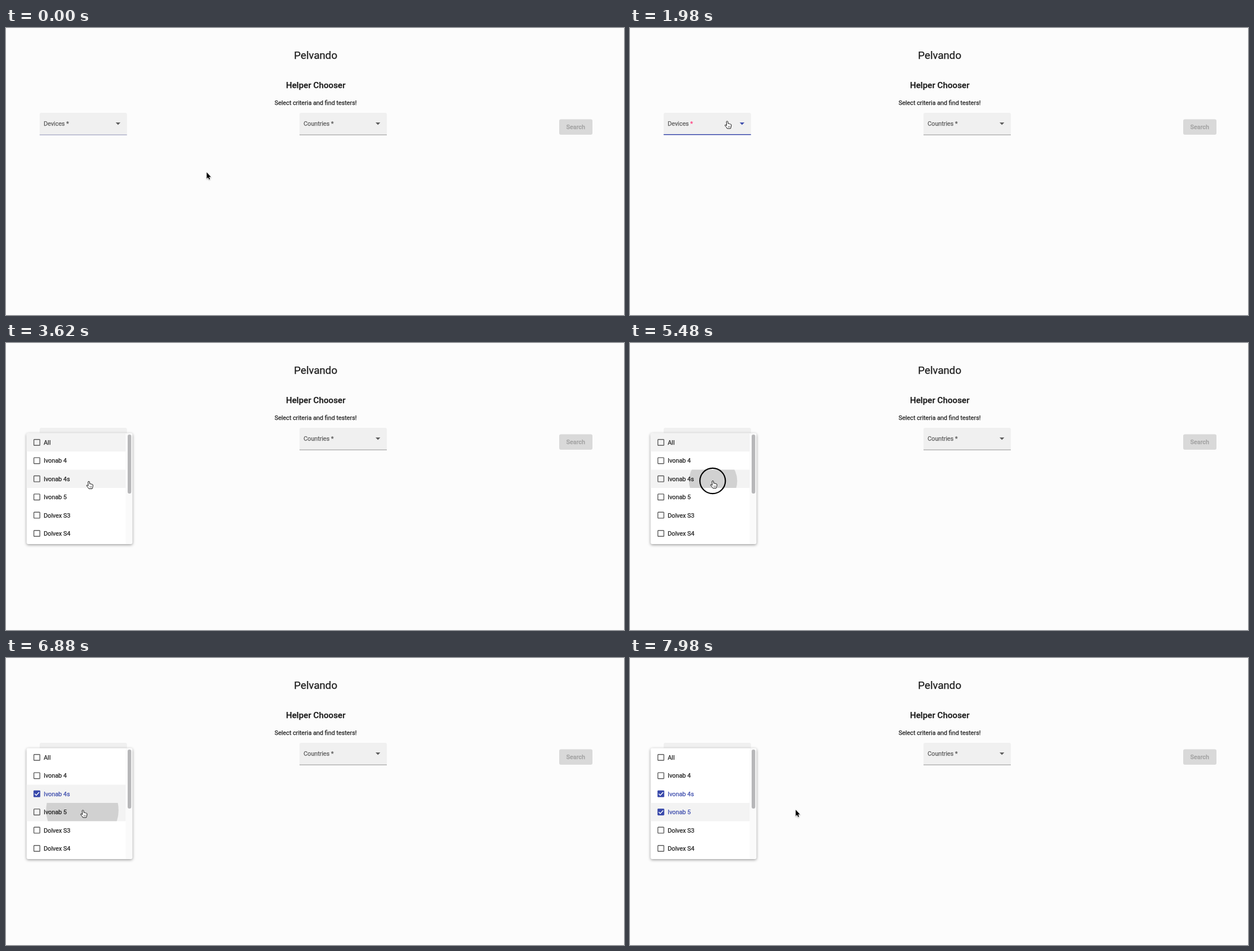
These frames come from a looping animation (1097 px wide and 511 px high, 8000 ms). An HTML page with a canvas:

```html
<!DOCTYPE html>
<html lang="en">
<head>
<meta charset="utf-8">
<title>Helper Chooser</title>
<style>
html, body { margin: 0; width: 100%; height: 100%; overflow: hidden; background: #fcfcfc; }
canvas { display: block; }
</style>
</head>
<body>
<canvas id="stage" width="1097" height="511"></canvas>
<script>
const ctx = document.getElementById('stage').getContext('2d');
const LOOP = 8000;
const BLUE = '#3949ab', INK = '#1c1c1c', GREY = '#5a5a5a';
const OPTIONS = ['All', 'Ivonab 4', 'Ivonab 4s', 'Ivonab 5', 'Dolvex S3', 'Dolvex S4'];
const ROW_TOP = 160.8, ROW_HEIGHT = 32.4;
const PANEL = { x: 36.5, y: 160.5, w: 188, h: 197.5 };
const FOCUS_TIME = 1950, OPEN_TIME = 2070;

// Pointer hotspot: time, x, y
const PATH = [
  [0, 356.3, 257], [600, 356.3, 257], [1750, 172.5, 166.5], [2200, 172.5, 166.5],
  [2633, 165.5, 204.5], [3560, 147, 247], [5000, 147, 247], [5400, 147, 246],
  [5750, 147, 246], [6600, 136.5, 271.5], [7250, 136.5, 271.5], [7973, 294.5, 270.3]
];
const RIPPLES = [
  { row: 2, x: 147.5, y: 245.5, press: 5440 },
  { row: 3, x: 135.5, y: 271, press: 6812 }
];
const RINGS = [[2000, 2180], [5465, 5620], [6900, 7040]];
const CHECKED_AT = { 2: 5570, 3: 7000 };

const ARROW = new Path2D('M0 0V11.2L2.5 8.9L4.2 12.8L5.9 12L4.2 8.2H7.6Z');
const HAND = new Path2D('M-1.3 0Q0 -1.5 1.2 0L1.8 4Q3.4 3.2 4 4.3Q5.6 3.7 6 5Q7.4 4.8 7.4 6.2' +
  'L6.9 9.7L6 12.5H0L-1.5 10.2L-4 7.2Q-4 5.5 -2.4 6.2L-1 7.4Z');

const clamp = v => Math.max(0, Math.min(1, v));
const smooth = v => v * v * (3 - 2 * v);

// Motion advances in equal steps held for 100, 20 and 20 ms, with one long rest.
function steppedTime(ms) {
  if (ms >= 3620 && ms < 4600) ms = 3620;
  const shifted = ms + 120;
  const phase = shifted % 140;
  const slot = phase < 100 ? 0 : phase < 120 ? 1 : 2;
  return Math.max(0, shifted - phase - 120 + slot * 140 / 3);
}

function pointerAt(time) {
  const next = PATH.findIndex(p => p[0] > time);
  if (next < 0) return PATH[PATH.length - 1].slice(1);
  const [t0, x0, y0] = PATH[next - 1], [t1, x1, y1] = PATH[next];
  const k = smooth((time - t0) / (t1 - t0));
  return [x0 + (x1 - x0) * k, y0 + (y1 - y0) * k];
}

function box(x, y, w, h, color, radius = 0) {
  ctx.fillStyle = color;
  ctx.beginPath();
  ctx.roundRect(x, y, w, h, radius);
  ctx.fill();
}

// A hairline stroke gives the text its slightly heavier rendering.
function text(str, x, y, { size = 10.8, weight = 400, color = INK, align = 'left' } = {}) {
  ctx.font = `${weight} ${size}px Roboto, sans-serif`;
  ctx.fillStyle = ctx.strokeStyle = color;
  ctx.lineWidth = 0.25;
  ctx.textAlign = align;
  ctx.fillText(str, x, y);
  ctx.strokeText(str, x, y);
  return ctx.measureText(str).width;
}

function polyline(points, color, width) {
  ctx.beginPath();
  points.forEach(p => ctx.lineTo(...p));
  ctx.strokeStyle = color;
  ctx.lineWidth = width;
  ctx.stroke();
}

function field(x, label, { focused = false, open = false, line = '#949494' } = {}) {
  box(x, 151, 155, 39.5, '#f0f0f0', [3, 3, 0, 0]);
  box(x, focused ? 189 : 189.7, 155, focused ? 1.6 : 1, focused ? BLUE : line);
  const size = open ? 8.1 : 10.8, y = open ? 166 : 174.4;
  const width = text(label + ' ', x + 7.2, y, { size, color: open ? BLUE : GREY });
  text('*', x + 7.2 + width, y, { size, color: focused ? '#ff4081' : GREY });
  ctx.fillStyle = focused ? BLUE : GREY;
  ctx.beginPath();
  ctx.moveTo(x + 135, 168.3);
  ctx.lineTo(x + 143.4, 168.3);
  ctx.lineTo(x + 139.2, 172.5);
  ctx.fill();
}

function page(time) {
  box(0, 0, 1097, 511, '#fcfcfc');
  const center = { align: 'center' };
  text('Pelvando', 549.7, 55, { ...center, size: 18.7 });
  text('Helper Chooser', 549.7, 106.5, { ...center, size: 15.2, weight: 500 });
  text('Select criteria and find testers!', 549.7, 137.3, center);
  field(59.7, 'Devices', {
    focused: time > FOCUS_TIME,
    open: time > OPEN_TIME,
    line: time < 300 ? '#9093b8' : '#949494'
  });
  field(521, 'Countries');
  box(982, 162.5, 59, 27.5, '#d9d9d9', 3);
  text('Search', 1011.2, 180, { ...center, weight: 500, color: '#a3a3a3' });
}

function drawRipple({ row, x, y, press }, time) {
  const age = time - press;
  if (age < 0 || age > 850) return;
  const radius = 115 * (1 - (1 - clamp(age / 450)) ** 5);
  ctx.save();
  ctx.beginPath();
  ctx.rect(PANEL.x, ROW_TOP + row * ROW_HEIGHT, 176, ROW_HEIGHT);
  ctx.clip();
  ctx.fillStyle = `rgba(0,0,0,${0.14 * (1 - clamp((age - 450) / 400))})`;
  ctx.beginPath();
  ctx.arc(x, y, radius, 0, 7);
  ctx.fill();
  ctx.restore();
}

function option(label, row, checked) {
  const y = ROW_TOP + (row + 0.5) * ROW_HEIGHT;
  if (checked) {
    box(48.8, y - 6, 12, 12, BLUE, 1.4);
    polyline([[51, y], [53.7, y + 2.7], [58.8, y - 2.8]], '#fff', 1.5);
  } else {
    ctx.strokeStyle = GREY;
    ctx.lineWidth = 1.4;
    ctx.beginPath();
    ctx.roundRect(49.5, y - 5.3, 10.6, 10.6, 0.8);
    ctx.stroke();
  }
  text(label, 67, y + 3.9, { color: checked ? BLUE : INK });
}

function panel(time, hovered) {
  const opening = clamp((time - OPEN_TIME) / 120);
  if (!opening) return;
  ctx.save();
  ctx.globalAlpha = opening;
  ctx.translate(0, PANEL.y);
  ctx.scale(1, 0.8 + 0.2 * opening);
  ctx.translate(0, -PANEL.y);

  ctx.save();
  ctx.shadowColor = 'rgba(0,0,0,.4)';
  ctx.shadowBlur = 5;
  ctx.shadowOffsetY = 1.6;
  box(PANEL.x, PANEL.y, PANEL.w, PANEL.h, '#fff', 3);
  ctx.restore();

  const active = time < CHECKED_AT[2] ? 0 : time < CHECKED_AT[3] ? 2 : 3;
  OPTIONS.forEach((label, row) => {
    if (row === active || row === hovered)
      box(PANEL.x, ROW_TOP + row * ROW_HEIGHT, 176, ROW_HEIGHT, '#f3f3f3');
  });
  RIPPLES.forEach(r => drawRipple(r, time));
  OPTIONS.forEach((label, row) => option(label, row, time >= CHECKED_AT[row]));

  box(212.5, 161, 11.5, 196.5, '#fafafa', [0, 3, 3, 0]);
  box(216, 163, 6.3, 105, '#b7b7b9', 3.1);
  ctx.restore();
}

function pointer(x, y, isHand) {
  ctx.save();
  ctx.translate(x, y);
  ctx.lineJoin = 'round';
  if (isHand) {
    ctx.fillStyle = '#fff';
    ctx.fill(HAND);
    ctx.strokeStyle = '#111';
    ctx.lineWidth = 1;
    ctx.stroke(HAND);
    polyline([[2.2, 8], [2.2, 10.6]], '#111', 0.7);
    polyline([[4.4, 8], [4.4, 10.6]], '#111', 0.7);
  } else {
    ctx.shadowColor = 'rgba(0,0,0,.3)';
    ctx.shadowBlur = 2;
    ctx.shadowOffsetY = 1;
    ctx.strokeStyle = '#fff';
    ctx.lineWidth = 1.4;
    ctx.stroke(ARROW);
    ctx.shadowColor = 'transparent';
    ctx.fillStyle = '#000';
    ctx.fill(ARROW);
  }
  ctx.restore();
}

function draw(ms) {
  const time = steppedTime(ms);
  const [x, y] = pointerAt(time);
  const isOpen = time > OPEN_TIME;
  const isHand = isOpen ? x < PANEL.x + PANEL.w : x < 214 && y < 190;
  const hovered = isOpen && x < 212 ? Math.floor((y - ROW_TOP) / ROW_HEIGHT) : -1;

  page(time);
  panel(time, hovered);
  if (RINGS.some(([start, end]) => time >= start && time < end)) {
    ctx.strokeStyle = '#000';
    ctx.lineWidth = 2.2;
    ctx.beginPath();
    ctx.arc(x - 0.3, y - 0.5, 22.6, 0, 7);
    ctx.stroke();
  }
  pointer(x, y, isHand);
}

function tick() {
  draw(performance.now() % LOOP);
  requestAnimationFrame(tick);
}
tick();
</script>
</body>
</html>
```
